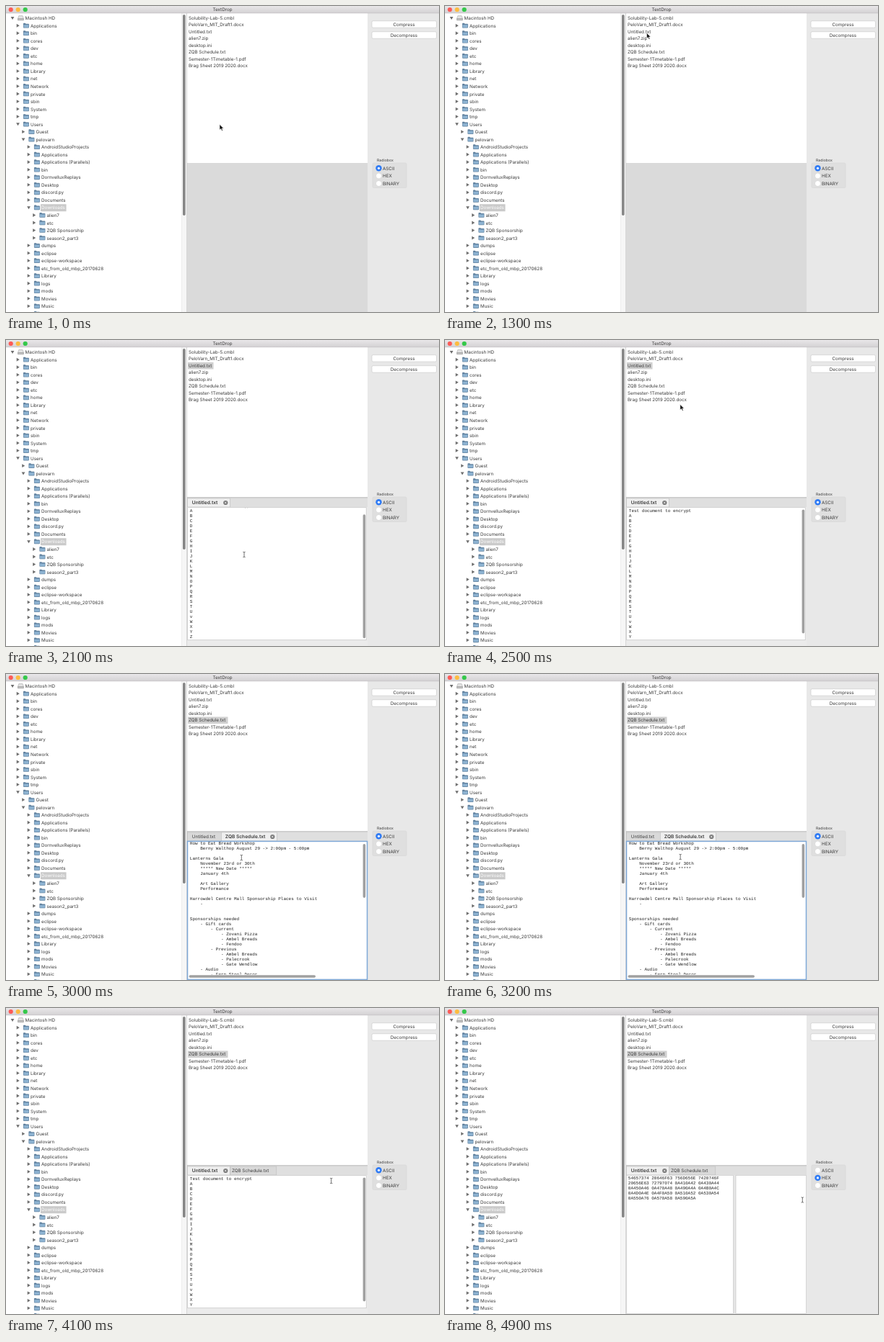
An HTML page that plays this animation: 600x425 px, repeating every 5 s.

```html
<!DOCTYPE html>
<html lang="en">
<head>
<meta charset="utf-8">
<title>TextDrop</title>
<style>
  html, body { margin: 0; width: 100%; height: 100%; overflow: hidden; background: #fff; }
  #stage { display: block; width: 600px; height: 425px; }
  text { font: 6.25px Inter, "Open Sans", sans-serif; fill: #3a3a3a; white-space: pre; text-rendering: geometricPrecision; }
  .code { font: 6px "Liberation Mono", monospace; fill: #222; }
  .bold { font-weight: 600; font-size: 6.6px; }
  .small { font-size: 5.2px; }
  .mid { text-anchor: middle; }
</style>
</head>
<body>
<svg id="stage" viewBox="0 0 600 425">
  <defs>
    <linearGradient id="bar" x2="0" y2="1">
      <stop stop-color="#e9e7e9"/><stop offset="1" stop-color="#d3d1d3"/>
    </linearGradient>
    <g id="folder">
      <path d="M0 1.2Q0 .3 .8 .3H2.8L3.7 1.2H7.3Q8 1.2 8 2V6.2Q8 7 7.2 7H.8Q0 7 0 6.2Z" fill="#62829f"/>
      <path d="M.6 2.6H7.4V6.3H.6Z" fill="#8db3d2"/>
    </g>
    <g id="drive">
      <path d="M1.4 .6H6.6L8 4.6H0Z" fill="#e4e4e4" stroke="#999" stroke-width=".5"/>
      <path d="M0 4.6H8V6.8H0Z" fill="#c4c4c4" stroke="#888" stroke-width=".5"/>
    </g>
  </defs>
</svg>
<script>
const stage = document.getElementById("stage");

function el(parent, tag, attrs = {}, content) {
  const node = document.createElementNS("http://www.w3.org/2000/svg", tag);
  for (const key in attrs) node.setAttribute(key, attrs[key]);
  if (content !== undefined) node.textContent = content;
  return parent.appendChild(node);
}
const rect = (p, x, y, width, height, fill, more) => el(p, "rect", { x, y, width, height, fill, ...more });
const label = (p, x, y, str, cls = "") => el(p, "text", { x, y: y + 2.2, class: cls }, str);
const circle = (p, cx, cy, r, fill, more) => el(p, "circle", { cx, cy, r, fill, ...more });
const show = (node, on) => node.setAttribute("display", on ? "inline" : "none");

// Window panes
rect(stage, 0, 0, 600, 425, "#fff");
rect(stage, 243.5, 10, 7.5, 415, "#f6f6f6");
rect(stage, 243.3, 10, .5, 415, "#e0e0e0");
rect(stage, 250, 10, 1, 415, "#d6d6d6");
rect(stage, 245, 12, 3.6, 279, "#868686", { rx: 1.8 });
rect(stage, 251, 218, 250, 207, "#dadada");
rect(stage, 501, 10, 99, 415, "#e8e8e8");
rect(stage, 0, 0, 600, 10, "url(#bar)");
rect(stage, 0, 9.6, 600, .6, "#bdbbbd");
["#fc5b57", "#fdbc40", "#34c84a"].forEach((c, i) => circle(stage, 6.7 + 10 * i, 5, 3.1, c));
label(stage, 300, 5, "TextDrop", "mid");

// Folder tree: leading digit is the depth
const tree = `0Macintosh HD
1Applications|1bin|1cores|1dev|1etc|1home|1Library|1net|1Network|1private|1sbin|1System|1tmp|1Users
2Guest|2pelovarn
3AndroidStudioProjects|3Applications|3Applications (Parallels)|3bin|3DornvelluxReplays|3Desktop
3discord.py|3Documents|3Downloads
4alien7|4etc|4ZQB Sponsorship|4season2_part3
3dumps|3eclipse|3eclipse-workspace|3etc_from_old_mbp_20170628|3Library|3logs|3mods|3Movies|3Music|3Parallels`
  .split(/[|\n]/);
tree.forEach((row, i) => {
  const depth = +row[0], name = row.slice(1), x = 7.5 * depth, y = 17 + 10.53 * i;
  const open = i + 1 < tree.length && +tree[i + 1][0] > depth;
  el(stage, "path", {
    d: open ? "M-2.4 -1.8H2.4L0 2.2Z" : "M-1.8 -2.4V2.4L2.2 0Z",
    transform: `translate(${9 + x} ${y - .3})`, fill: "#6e6e6e"
  });
  el(stage, "use", { href: i ? "#folder" : "#drive", x: 16.4 + x, y: y - 4 });
  const picked = name === "Downloads";
  if (picked) rect(stage, 48, y - 5, 35.5, 10, "#cacaca");
  const text = label(stage, 26.5 + x, y, name);
  if (picked) text.style.fill = "#fff";
});

// File list
const files = ["Solubility-Lab-5.cmbl", "PeloVarn_MIT_Draft1.docx", "Untitled.txt", "alien7.zip", "desktop.ini",
  "ZQB Schedule.txt", "Semester-1Timetable-1.pdf", "Brag Sheet 2019 2020.docx"];
const fileY = i => 16.7 + 9.5 * i;
const marks = [2, 5].map((i, n) => rect(stage, 252, fileY(i) - 4.7, n ? 55.5 : 35.5, 9.5, "#cfcfcf"));
files.forEach((name, i) => label(stage, 253, fileY(i), name));

// Right panel
["Compress", "Decompress"].forEach((name, i) => {
  const y = 20.7 + 15 * i;
  rect(stage, 507, y, 89.5, 9.5, "#fff", { rx: 1.8, stroke: "#c6c6c6", "stroke-width": .6 });
  label(stage, 551.5, y + 4.9, name, "mid");
});
label(stage, 514, 214, "Radiobox", "small");
rect(stage, 508, 218, 47, 34.5, "#dfdfdf", { rx: 1.5, stroke: "#d3d3d3", "stroke-width": .5 });
const dots = ["ASCII", "HEX", "BINARY"].map((name, i) => {
  const y = 225.3 + 10.6 * i;
  circle(stage, 516.5, y, 4, "#fff", { stroke: "#c4c4c4", "stroke-width": .5 });
  label(stage, 522, y + .2, name);
  const dot = el(stage, "g");
  circle(dot, 516.5, y, 4.2, "#2f7bf5");
  circle(dot, 516.5, y, 1.6, "#fff");
  return dot;
});

// Documents
const note = ["Test document to encrypt", ..."ABCDEFGHIJKLMNOPQRSTUvWXYZ"];
const hex = [...note.join("\n")].map(c => c.charCodeAt(0).toString(16).toUpperCase().padStart(2, "0")).join("")
  .match(/.{1,32}/g).map(row => row.match(/.{1,8}/g).join(" "));
const plan = `How to Eat Bread Workshop
    Berny Walthop August 29 -> 2:00pm - 5:00pm

Lanterns Gala
    November 23rd or 30th
    ***** New Date *****
    January 4th

    Art Gallery
    Performance

Harrowdel Centre Mall Sponsorship Places to Visit
    -


Sponsorships needed
    - Gift cards
        - Current
            - Zovani Pizza
            - Ambel Breads
            - Fendoo
        - Previous
            - Ambel Breads
            - Palecrook
            - Gate Wendlow
    - Audio
        - Fern Stool Decor
    - Table Linen
        - Fern Stool Decor
    - Chair Linen
        - Fern Stool Decor ($1785)
    - Brochures
        - For program printing and menu
        - https://www.six-hillprinting.com/productBrochures.html
        - Six hill printing
        - 200 (one per person)

Giant Signs for Display
    https://www.ohmyprintsolutions.com/shop/backdrop-stand/
    https://www.ohmyprintsolutions.com/shop/step-and-repeat-backdrop/
Program printing/brochures
    https://www.six-hillprinting.com/productBrochures.html
Menus
    https://www.six-hillprinting.com/productBrochures.html
General Signage`.split("\n");

function lines(parent, rows, x, y, w, h, first) {
  const clip = el(parent, "svg", { x, y, width: w, height: h, viewBox: `${x} ${y} ${w} ${h}` });
  const body = el(clip, "g");
  rows.forEach((row, i) => label(body, x + 2.5, first + 7 * i, row, "code"));
  return body;
}

function tab(g, x, w, name, active, pad = 6.5) {
  rect(g, x, 220, w, 12, active ? "#efefef" : "#d9d9d9", { stroke: "#bcbcbc", "stroke-width": .6 });
  label(g, x + pad, 226, name, active ? "bold" : "");
  if (!active) return;
  const cx = x + w - 6;
  circle(g, cx, 226, 3.1, "#777");
  el(g, "path", { d: `M${cx - 1.2} 224.8l2.4 2.4m0 -2.4l-2.4 2.4`, stroke: "#fff", "stroke-width": .8 });
}

function view() {
  const g = el(stage, "g");
  rect(g, 251, 218, 250, 14, "#dfdfdf");
  rect(g, 251, 218, 250, 1.6, "#cbcbcb");
  return g;
}

const thumb = (g, height) => rect(g, 494.6, 235.5, 3.6, height, "#a0a0a0", { rx: 1.8 });

function noteView(both) {
  const g = view();
  tab(g, 251.3, 59, files[2], true);
  if (both) tab(g, 310.8, 64, files[5], false, 2.2);
  rect(g, 251, 232, 250, 193, "#ebebeb");
  rect(g, 251.7, 232.7, 247.5, 184, "#fff", { stroke: "#c4c4c4", "stroke-width": .7 });
  g.body = lines(g, note, 252.3, 233, 241, 183.5, 236.8);
  g.thumb = thumb(g, 172);
  g.ratio = .96;
  return g;
}

function planView() {
  const g = view();
  tab(g, 251.3, 47.5, files[2], false);
  tab(g, 298.3, 77, files[5], true, 5.5);
  rect(g, 251.5, 232.4, 249, 192, "#fff", { stroke: "#7fa9d8", "stroke-width": 1.5 });
  g.body = lines(g, plan, 252.3, 233, 241, 184.5, 236.2);
  g.thumb = thumb(g, 75);
  g.ratio = .415;
  rect(g, 253.5, 418.2, 175.5, 3.6, "#a0a0a0", { rx: 1.8 });
  return g;
}

function hexView() {
  const g = view();
  tab(g, 251.3, 59, files[2], true);
  tab(g, 310.8, 64, files[5], false, 2.2);
  rect(g, 251, 232, 250, 193, "#e6e6e6");
  for (const [x, w] of [[251.3, 148], [403, 97.5]])
    rect(g, x, 232.3, w, 192.2, "#fff", { stroke: "#c4c4c4", "stroke-width": .6 });
  lines(g, hex, 251.3, 232.4, 146, 192, 235.7);
  return g;
}

const views = [noteView(false), planView(), noteView(true), hexView()];
const starts = [1500, 2700, 3700, 4500];

const arrow = el(stage, "path", {
  d: "M0 0V7.6L1.8 6L3.1 8.8L4.4 8.2L3.1 5.5H5.5Z", fill: "#111", stroke: "#fff", "stroke-width": .5
});
const beam = el(stage, "path", {
  d: "M-1.6 -3.7Q0 -3.7 0 -2.7Q0 -3.7 1.6 -3.7M0 -2.7V2.7M-1.6 3.7Q0 3.7 0 2.7Q0 3.7 1.6 3.7",
  fill: "none", stroke: "#333", "stroke-width": .7
});

// Keys are [time, ...values]
const pointer = [[0, 296, 164.5], [100, 296, 163], [600, 288, 100], [900, 287, 95], [1300, 279.5, 37.5],
  [1400, 279.5, 37.5], [1500, 282.8, 40.5], [2000, 330, 300], [2100, 330, 298], [2500, 325.8, 89.5], [2600, 318, 71],
  [2700, 303, 65], [3000, 326.3, 255], [3400, 326, 253], [3500, 324, 252], [3700, 282, 226], [3900, 284, 226],
  [4200, 534, 247], [4300, 518, 237], [4500, 517, 237], [4900, 495.3, 266.5]];
const noteScroll = [[1700, 0], [1900, 7], [2100, 7], [2300, 0]];
const planScroll = [[2900, 0], [3000, 1], [3200, 1], [3400, 145.5]];

function sample(keys, t) {
  const next = keys.findIndex(k => k[0] > t);
  if (next < 0) return keys[keys.length - 1].slice(1);
  if (!next) return keys[0].slice(1);
  const a = keys[next - 1], b = keys[next], f = (t - a[0]) / (b[0] - a[0]);
  return a.slice(1).map((v, i) => v + (b[i + 1] - v) * f);
}

function scroll(v, offset) {
  v.body.setAttribute("transform", `translate(0 ${-offset})`);
  v.thumb.setAttribute("y", 235.5 + offset * v.ratio);
}

function draw(now) {
  const t = Math.floor(now % 5000 / 100) * 100;
  const current = starts.filter(s => s <= t).length - 1;
  views.forEach((v, i) => show(v, i === current));
  show(marks[0], current === 0);
  show(marks[1], current > 0);
  dots.forEach((d, i) => show(d, i === (current === 3 ? 1 : 0)));
  scroll(views[0], sample(noteScroll, t)[0]);
  scroll(views[1], sample(planScroll, t)[0]);

  const [x, y] = sample(pointer, t);
  const inText = x > 252 && x < 500 && y > 233;
  show(arrow, !inText);
  show(beam, inText);
  for (const c of [arrow, beam]) c.setAttribute("transform", `translate(${x} ${y})`);
}

const begin = performance.now();
function loop() {
  draw(performance.now() - begin);
  requestAnimationFrame(loop);
}
loop();
</script>
</body>
</html>
```
